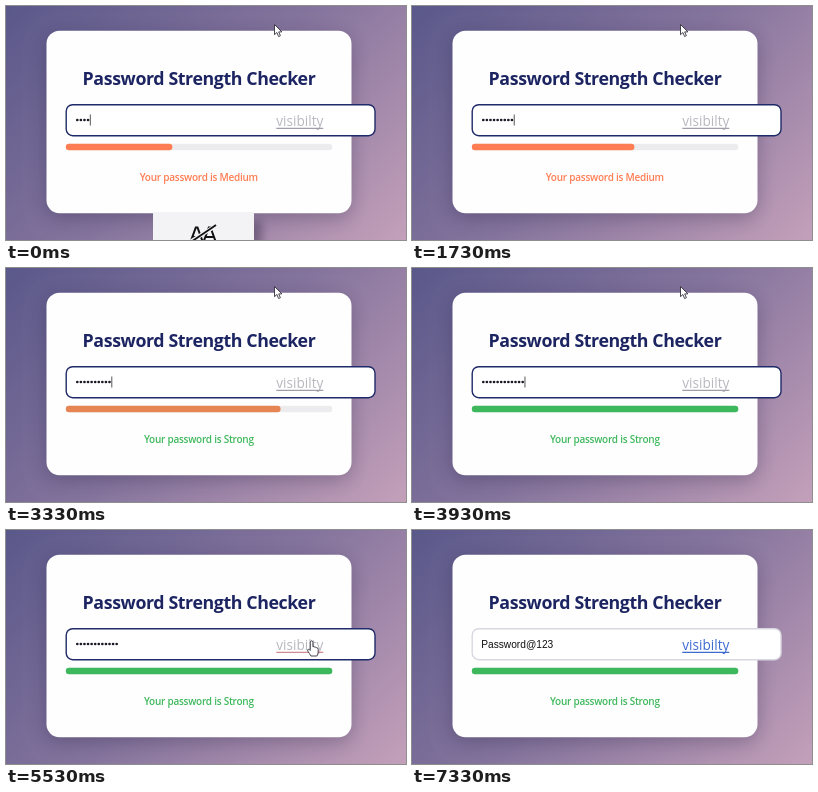
Recreate the animation shown at these times as an HTML page with a canvas. Size 400 by 234 pixels, loop 7.4 s.

```html
<!DOCTYPE html>
<html lang="en">
<head>
<meta charset="utf-8">
<title>Password Strength Checker</title>
<style>
  html, body { margin: 0; width: 100%; height: 100%; overflow: hidden; background: #7d7099; }
  canvas { display: block; width: 400px; height: 234px; }
</style>
</head>
<body>
<canvas id="stage"></canvas>
<script>
const W = 400, H = 234, LOOP = 7400;
const canvas = document.getElementById('stage');
const ratio = window.devicePixelRatio || 1;
canvas.width = W * ratio;
canvas.height = H * ratio;
const ctx = canvas.getContext('2d');
ctx.scale(ratio, ratio);

const UI = '"Open Sans", "Noto Sans", sans-serif';
const PASSWORD = 'Password@123';
const NAVY = [31, 42, 104], PALE = [216, 216, 224];
const ORANGE = [255, 125, 82], GREEN = [62, 184, 92];

// When each character after the first four is typed
const KEYS = [250, 500, 750, 1000, 1670, 3300, 3550, 3800];
const BLINK = 450;
const PRESS = 5480, RELEASE = 5640;

// Bar width changes: [time, level]
const LEVELS = [[1000, 0.6], [1690, 0.8], [3300, 1]];

// Pointer path: [time, x, y]
const PATH = [[4880, 268.5, 18.5], [5380, 305.5, 111.5], [5700, 305.5, 111.5], [6200, 302.5, 103]];
const POINTER_END = 6900;

const clamp = v => Math.max(0, Math.min(1, v));
const ramp = (t, start, length) => clamp((t - start) / length);
const ease = p => p * p * (3 - 2 * p);
const mix = (a, b, p) => a + (b - a) * p;
const blend = (a, b, p) => `rgb(${a.map((v, i) => Math.round(mix(v, b[i], p))).join()})`;

function box(x, y, w, h, r, fill) {
  ctx.beginPath();
  ctx.roundRect(x, y, w, h, r);
  ctx.fillStyle = fill;
  ctx.fill();
}

function text(str, x, y, font, color, align = 'left', spacing = 0) {
  ctx.font = font;
  ctx.letterSpacing = `${spacing}px`;
  ctx.textAlign = align;
  ctx.fillStyle = color;
  ctx.fillText(str, x, y);
}

function line(x1, y1, x2, y2, width, color) {
  ctx.beginPath();
  ctx.moveTo(x1, y1);
  ctx.lineTo(x2, y2);
  ctx.lineWidth = width;
  ctx.strokeStyle = color;
  ctx.stroke();
}

function background() {
  const g = ctx.createLinearGradient(41, -42, 359, 276);
  g.addColorStop(0, '#5a588a');
  g.addColorStop(0.5, '#85749d');
  g.addColorStop(1, '#c4a0ba');
  ctx.fillStyle = g;
  ctx.fillRect(0, 0, W, H);
}

function card() {
  ctx.save();
  ctx.shadowColor = 'rgba(30, 25, 60, 0.3)';
  ctx.shadowBlur = 20 * ratio;
  ctx.shadowOffsetY = 5 * ratio;
  box(40.5, 24.8, 305, 182.5, 13, '#fffeff');
  ctx.restore();
  text('Password Strength Checker', 193, 78.7, `700 17.8px ${UI}`, '#1c2562', 'center', -0.4);
}

function field(t) {
  const typed = KEYS.filter(k => t >= k);
  const count = 4 + typed.length;
  box(60.2, 98.7, 308.8, 31, 6.5, '#fff');
  ctx.lineWidth = 1.4;
  ctx.strokeStyle = blend(NAVY, PALE, ramp(t, 5540, 250));
  ctx.stroke();

  if (t >= RELEASE) {
    text(PASSWORD, 69.2, 118, '10.2px "Liberation Sans", Arial, sans-serif', '#111');
  } else {
    ctx.fillStyle = '#1c1826';
    for (let i = 0; i < count; i++) {
      ctx.beginPath();
      ctx.arc(71.3 + i * 3.58, 114, 1.35, 0, 7);
      ctx.fill();
    }
    const since = t - (typed.length ? typed[typed.length - 1] : 0);
    if (t < PRESS && Math.floor(since / BLINK) % 2 === 0) {
      const x = 70 + count * 3.58;
      line(x, 108.5, x, 119.5, 0.9, '#444');
    }
  }

  const shown = t >= RELEASE;
  const pressed = t >= PRESS && !shown;
  text('visibilty', 270.3, 120, `500 13.6px ${UI}`, shown ? '#3c6cd0' : '#b9b7bf');
  line(270.3, 122.4, 317.3, 122.4, 1.1, shown ? '#3c6cd0' : pressed ? '#d08a92' : '#a09ea8');
}

function meter(t) {
  let level = 0.4;
  for (const [at, next] of LEVELS) level = mix(level, next, ease(ramp(t, at, 300)));
  box(59.8, 137.8, 266.5, 6.4, 3.2, '#ececef');
  box(59.8, 137.8, 266.5 * level, 6.4, 3.2, blend(ORANGE, GREEN, ramp(t, 3300, 250)));
  const strong = t >= LEVELS[2][0];
  text(`Your password is ${strong ? 'Strong' : 'Medium'}`, 192.8, 175.3,
    `600 10px ${UI}`, blend(ORANGE, GREEN, strong ? 1 : 0), 'center', -0.25);
}

function capsNotice(t) {
  const alpha = 1 - ramp(t, 1050, 150);
  if (!alpha) return;
  ctx.save();
  ctx.globalAlpha = alpha;
  ctx.save();
  ctx.beginPath();
  ctx.rect(0, 207.5, W, H);
  ctx.clip();
  ctx.shadowColor = 'rgba(40, 30, 60, 0.4)';
  ctx.shadowBlur = 10 * ratio;
  ctx.shadowOffsetX = 8 * ratio;
  ctx.shadowOffsetY = 9 * ratio;
  box(147, 206, 101, 40, 2, '#f3f2f4');
  ctx.restore();
  box(147, 206, 101, 40, 2, '#f3f2f4');
  ctx.lineJoin = 'miter';
  ctx.strokeStyle = '#111';
  ctx.lineWidth = 2;
  for (const x of [184.5, 197.5]) {
    ctx.beginPath();
    ctx.moveTo(x, 236);
    ctx.lineTo(x + 5.3, 221.5);
    ctx.lineTo(x + 7, 221.5);
    ctx.lineTo(x + 12.3, 236);
    ctx.moveTo(x + 2, 231);
    ctx.lineTo(x + 10, 231);
    ctx.stroke();
  }
  line(184, 236, 211, 219, 4, '#f3f2f4');
  line(185, 236, 210, 219, 1.8, '#111');
  ctx.restore();
}

const ARROW = new Path2D('M0 0V10.2L2.4 8L4.1 12L5.9 11.2L4.2 7.4H7.4Z');
const HAND = new Path2D('M-1.2 8V1Q-1.2 -.7 .1 -.7T1.4 1V5.2Q2.8 4.6 3.3 5.7Q4.6 5.1 5.1 6.3' +
  'Q6.7 6 6.7 7.8V10.5Q6.7 12.5 5.4 14.5H-.6Q-2 12 -3.7 9.6Q-4.3 8.2 -3.2 7.7Q-2.4 7.5 -1.2 9Z');

function pointer(t) {
  if (t >= POINTER_END) return;
  let [, x, y] = PATH[0];
  for (let i = 1; i < PATH.length; i++) {
    const [from] = PATH[i - 1], [to, px, py] = PATH[i];
    const p = ease(ramp(t, from, to - from));
    x = mix(x, px, p);
    y = mix(y, py, p);
  }
  const shape = y > 101 ? HAND : ARROW;
  ctx.save();
  ctx.translate(x, y);
  ctx.lineJoin = 'round';
  ctx.lineWidth = 0.9;
  ctx.fillStyle = '#fff';
  ctx.strokeStyle = '#34323c';
  ctx.fill(shape);
  ctx.stroke(shape);
  ctx.restore();
}

function draw() {
  const t = performance.now() % LOOP;
  background();
  card();
  field(t);
  meter(t);
  capsNotice(t);
  pointer(t);
  requestAnimationFrame(draw);
}
draw();
</script>
</body>
</html>
```
